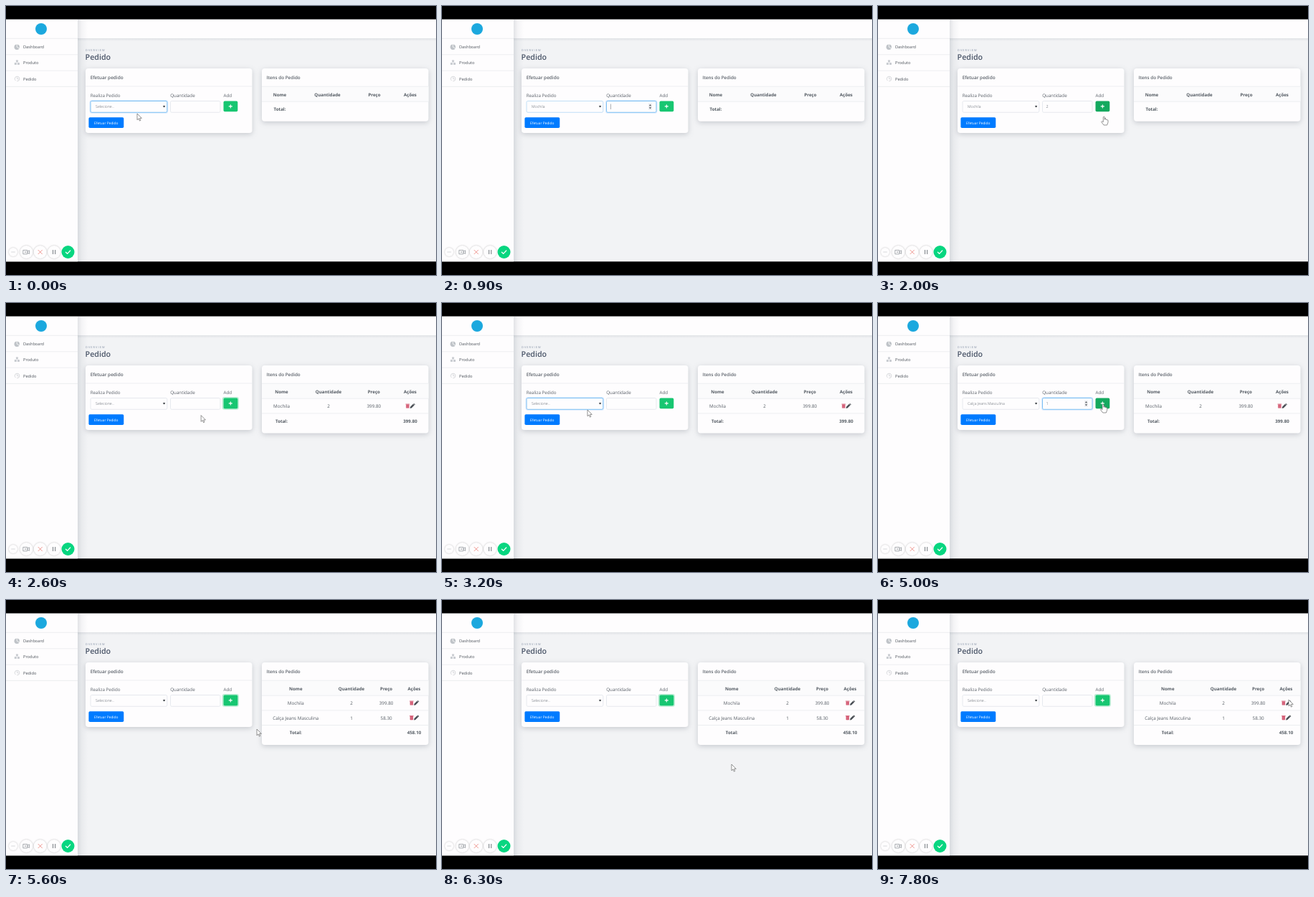
An HTML page that plays this animation: 600 px wide and 375 px high, repeating every 8000 ms.

```html
<!DOCTYPE html>
<html lang="pt">
<head>
<meta charset="utf-8">
<title>Pedido</title>
<style>
  html, body { margin: 0; width: 100%; height: 100%; overflow: hidden; background: #000; }
  svg { display: block; width: 100vw; height: 100vh; }
  text { font-family: "Open Sans", "Noto Sans", sans-serif; text-rendering: geometricPrecision; }
  .card { fill: #fefdfe; filter: drop-shadow(0 2.5px 3.5px rgba(70, 80, 95, .25)); }
  .line { stroke: #e6e8eb; stroke-width: .7; }
  .disc { fill: #fefdfe; filter: drop-shadow(0 .6px 1.2px rgba(0, 0, 0, .25)); }
  .icon { fill: none; stroke-linecap: round; stroke-linejoin: round; }
</style>
</head>
<body>
<svg viewBox="0 0 600 375" preserveAspectRatio="none">
  <defs>
    <linearGradient id="sideShade">
      <stop stop-color="#596574" stop-opacity=".17"/>
      <stop offset=".4" stop-color="#596574" stop-opacity=".06"/>
      <stop offset="1" stop-color="#596574" stop-opacity="0"/>
    </linearGradient>
    <linearGradient id="topShade" x2="0" y2="1">
      <stop stop-color="#596574" stop-opacity=".12"/><stop offset="1" stop-color="#596574" stop-opacity="0"/>
    </linearGradient>
  </defs>
  <g id="page"></g>
  <g id="live"></g>
  <g id="pointer"></g>
</svg>
<script>
const LOOP = 8000, TICK = 100;
const WHITE = '#fefdfe', TOP = 18.75, HEIGHT = 337.5;
const $ = id => document.getElementById(id);

const rect = (x, y, w, h, fill, extra = '') =>
  `<rect x="${x}" y="${y}" width="${w}" height="${h}" fill="${fill}" ${extra}/>`;
const line = (x1, x2, y) => `<line class="line" x1="${x1}" x2="${x2}" y1="${y}" y2="${y}"/>`;
const text = (x, y, size, str, { weight = 400, fill = '#5a6169', anchor = 'start', gap = 0 } = {}) =>
  `<text x="${x}" y="${y}" font-size="${size}" font-weight="${weight}" text-anchor="${anchor}"
    letter-spacing="${gap}" fill="${fill}">${str}</text>`;
const icon = (d, color, width = 1) => `<path class="icon" d="${d}" stroke="${color}" stroke-width="${width}"/>`;
const shape = (d, fill) => `<path d="${d}" fill="${fill}"/>`;
const disc = (x, r) => `<circle class="disc" cx="${x}" cy="343" r="${r}"/>`;

function drawPage() {
  const menu = ['Dashboard', 'Produto', 'Pedido'].map((label, i) =>
    text(24, 59 + i * 22.3, 5.65, label, { fill: '#4d535b' }) + line(0, 100, 67.8 + i * 22.3)).join('');

  const menuIcons =
    '<circle cx="15.2" cy="57.2" r="3.7" fill="#bfc3c8"/>' +
    icon('M15.2 53.5V57.2L18.5 59', '#fff', .8) +
    rect(13.9, 75.4, 3, 3, '#c9ccd1') + rect(11.8, 79, 3, 3, '#c9ccd1') + rect(15.9, 79, 3, 3, '#c9ccd1') +
    icon('M12.2 101.5A3.3 3.3 0 1 1 15.6 104.8M15.6 99.6V101.7H17.3M12 102.5L13.4 103.6', '#cdd0d4', .8);

  const recorder = disc(10, 6) + icon('M7.6 343H12.4', '#c4c7ca', .7) +
    disc(28.4, 9) +
    icon('M24.2 340.4H29.8V345.8H24.2ZM29.8 342.3L32.5 340.8V345.4L29.8 343.9', '#858a90', .7) +
    '<circle cx="27" cy="343.1" r=".8" fill="#858a90"/>' +
    disc(47.7, 9) + icon('M45 340.3L50.4 345.7M50.4 340.3L45 345.7', '#ee8d85', .9) +
    disc(67.1, 9) + icon('M65.6 340.4V345.6M68.7 340.4V345.6', '#70757b', 1) +
    '<circle cx="86.5" cy="343" r="9" fill="#08d680"/>' +
    icon('M83.4 343.2L85.6 345.3L89.7 341', '#fff', 1.2);

  return rect(0, TOP, 600, HEIGHT, '#f2f3f5') +
    rect(100, TOP, 500, 45 - TOP, WHITE) + rect(100, 45, 500, 4, 'url(#topShade)') +
    rect(100, TOP, 14, HEIGHT, 'url(#sideShade)') + rect(0, TOP, 100, HEIGHT, WHITE) + line(0, 100, 45.3) +
    '<circle cx="49" cy="32" r="8" fill="#1ba8de"/>' + menu + menuIcons + recorder +
    text(110.8, 63.2, 3.9, 'OVERVIEW', { fill: '#818ea3', gap: 1.1 }) +
    text(110.6, 75.4, 10.7, 'Pedido', { weight: 600, fill: '#4a5568' }) +
    rect(111, 87, 232.5, 90, WHITE, 'class="card" rx="4"') + line(111, 343.5, 112) +
    text(117.7, 102.3, 6.45, 'Efetuar pedido', { weight: 600 }) +
    text(117.7, 126.9, 6.2, 'Realiza Pedido') + text(229.2, 126.9, 6.25, 'Quantidade') +
    text(303.6, 126.9, 6.2, 'Add') +
    rect(115.4, 155.3, 48.9, 14.7, '#007bff', 'rx="1.8"') +
    text(139.8, 164.6, 4.85, 'Efetuar Pedido', { weight: 500, fill: '#fff', anchor: 'middle' });
}

const items = [['Mochila', '2', '399.80'], ['Calça Jeans Masculina', '1', '58.30']];
const totals = ['', '399.80', '458.10'];
const columns = [[382, 448.5, 514, 564], [384.5, 450, 513.3, 564], [404.3, 482, 530.6, 569.5]];

function actions(x, y) {
  return rect(x - 5.8, y - 2.4, 4.4, 5.2, '#d2566f', 'rx=".6"') + rect(x - 6.4, y - 3.2, 5.6, .9, '#d2566f') +
    icon(`M${x - 4.4} ${y - 1}V${y + 1.8}M${x - 2.8} ${y - 1}V${y + 1.8}`, '#e9a0ae', .4) +
    shape(`M${x - .4} ${y + 3}l.5 -2.1l4 -4l1.7 1.7l-4 4zM${x + 4.5} ${y - 3.2}l.8 -.7l1.6 1.6l-.7 .8z`, '#484d53');
}

function drawTable(count) {
  const cols = columns[count], bottom = 160.8 + count * 20.6;
  const cells = (labels, y, weight) => labels.map((label, i) =>
    text(cols[i], y, weight > 400 ? 6.15 : 6.3, label, { weight, anchor: 'middle', fill: '#545b63' })).join('');
  let out = rect(357, 87, 232.5, bottom - 87, WHITE, 'class="card" rx="4"') +
    text(363.6, 102.3, 6.3, 'Itens do Pedido', { weight: 600 }) +
    rect(357, 112, 232.5, 21, '#fbfbfc') + line(357, 589.5, 112.2) + line(357, 589.5, 133.2) +
    cells(['Nome', 'Quantidade', 'Preço', 'Ações'], 125.5, 700);
  items.slice(0, count).forEach((item, i) => {
    const y = 143.8 + i * 20.6;
    out += cells(item, y + 2.2, 400) + actions(cols[3], y) + line(357, 589.5, y + 10.1);
  });
  return out + cells(['Total:', '', '', totals[count]], 146 + count * 20.6, 700);
}

function field(x, w, focused, color = '#e1e5eb') {
  const glow = focused
    ? rect(x - .8, 131.7, w + 1.6, 17.4, 'none', 'rx="2.4" stroke="#007bff" stroke-opacity=".12" stroke-width="1.4"') : '';
  return glow + rect(x, 132.5, w, 15.8, WHITE, `rx="1.8" stroke="${focused ? '#5cb0f0' : color}" stroke-width=".8"`);
}

// start, product, quantity, focus, rows
const empty = 'Selecione...';
const steps = [
  [0, empty, '', 'select', 0],
  [700, 'Mochila', '', 'select', 0],
  [900, 'Mochila', '', 'qty', 0],
  [1400, 'Mochila', '2', 'qty', 0],
  [1800, 'Mochila', '2', '', 0],
  [2200, empty, '', 'add', 1],
  [3100, empty, '', 'select', 1],
  [4200, items[1][0], '', 'select', 1],
  [4500, items[1][0], '', 'qty', 1],
  [4800, items[1][0], '1', 'qty', 1],
  [5600, empty, '', 'add', 2]
];
const within = (t, a, b) => t >= a && t < b;
const overButton = t => within(t, 1700, 2200) || within(t, 4900, 5600);

function drawLive(t) {
  const [start, product, qty, focus, rows] = steps.filter(s => s[0] <= t).pop();
  const fading = focus === 'qty' && t - start < 200 && !qty;
  const soft = { weight: 300, fill: '#4f5760' };
  let out = drawTable(rows) +
    field(118, 106.8, focus === 'select', fading ? '#b3d9f5' : undefined) +
    text(125, 142.4, 5.3, product, soft) +
    shape('M219 139.1h3.2l-1.6 2.7z', '#30353b') +
    field(229.5, 69.5, focus === 'qty') + text(234.6, 142.4, 5.6, qty, soft);
  if (focus === 'qty') {
    out += rect(288, 135.6, 5, 9.2, '#eeeff1') +
      shape('M288.9 139.3h3.2l-1.6-2.3zM288.9 141.3h3.2l-1.6 2.3z', '#55595f');
    if (!qty) out += rect(235, 136.6, .6, 7.4, '#777d84');
  }
  if (focus === 'add')
    out += rect(302.6, 131.9, 21.4, 16, 'none', 'rx="2.4" stroke="#17c671" stroke-opacity=".3" stroke-width="1.8"');
  return out + rect(303.5, 132.6, 19.8, 14.6, overButton(t) ? '#14a95f' : '#17c671', 'rx="1.8"') +
    icon('M311.2 139.9H315.4M313.3 137.8V142', '#fff', 1.1);
}

// time, x, y of the pointer tip
const path = [
  [0, 183, 150], [400, 183, 150], [600, 168, 161], [700, 215, 150], [800, 262, 139],
  [1500, 262, 140], [1700, 314, 140], [1900, 315, 146], [2000, 315.3, 154], [2200, 315, 156],
  [2900, 240, 157], [3100, 205, 150], [3200, 203, 149], [3800, 203, 149], [4000, 170, 160],
  [4200, 175, 160], [4400, 262, 139], [4800, 285, 140], [5000, 314, 141], [5500, 314, 141],
  [5600, 350, 180], [5800, 404, 229], [6300, 404, 229], [6400, 410, 222], [7000, 563, 149],
  [7100, 567, 147], [7200, 571, 143], [7300, 571, 143], [7400, 567, 144], [7500, 570, 141],
  [7600, 571, 140], [7700, 571, 140], [7800, 573, 139], [8000, 573, 139]
];

function pointerAt(t) {
  const i = path.findIndex(p => p[0] > t);
  const [t0, x0, y0] = path[i - 1], [t1, x1, y1] = path[i];
  const k = (t - t0) / (t1 - t0);
  return [x0 + (x1 - x0) * k, y0 + (y1 - y0) * k];
}

function drawPointer(t) {
  if (within(t, 900, 1500) || within(t, 4500, 4800)) return '';
  const [x, y] = pointerAt(t);
  const d = overButton(t)
    ? 'M-1 7V.8Q0-.6 1 .8V4.3Q2-.0 2.8 4.5Q4 3.6 4.4 4.9Q5.7 4.3 5.7 5.8V8.2L4.3 12H-.3L-3.6 7.6Q-3.3 5.7-1 7.6Z'
    : 'M0 0V8.8L2 6.9L3.4 10.1L4.8 9.5L3.5 6.4H6.3Z';
  return `<path transform="translate(${x} ${y})" d="${d}" fill="#fff" stroke="#666" stroke-width=".7" stroke-linejoin="round"/>`;
}

$('page').innerHTML = drawPage();
let shown = -1;
function frame(now) {
  const t = Math.floor(now % LOOP / TICK) * TICK;
  if (t !== shown) {
    shown = t;
    $('live').innerHTML = drawLive(t);
    $('pointer').innerHTML = drawPointer(t);
  }
  requestAnimationFrame(frame);
}
frame(0);
</script>
</body>
</html>
```
